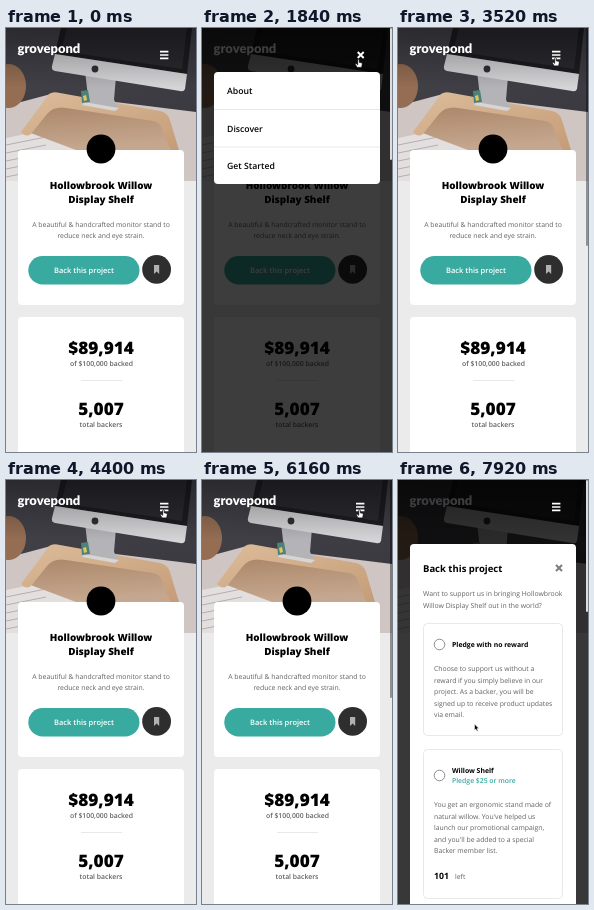
Animation, 190 px wide and 424 px high, one loop 8000 ms. Source, as an HTML page:

```html
<!DOCTYPE html>
<html lang="en">
<head>
<meta charset="utf-8">
<title>Campaign page</title>
<style>
  html, body { margin: 0; width: 100%; height: 100%; overflow: hidden; background: #ebebeb; }
  svg { display: block; width: 190px; height: 424px; }
  text { font: 6.85px "Open Sans", "Noto Sans", sans-serif; fill: #616161; text-rendering: geometricPrecision; }
  .mid { text-anchor: middle; }
  .semi { font-weight: 600; }
  .bold { font-weight: 700; fill: #000; }
  .title { font-size: 9.9px; font-weight: 800; }
  .stat { font-size: 17.2px; font-weight: 800; }
  .item { font-size: 8.7px; font-weight: 600; fill: #000; }
  .brand { font: 900 13px Lato, sans-serif; fill: #fff; }
  .line { fill: none; stroke: #e2e2e2; stroke-width: .8; }
  .radio { fill: #fff; stroke: #8b8b8b; stroke-width: 1; }
</style>
</head>
<body>
<svg viewBox="0 0 190 424">
  <defs>
    <linearGradient id="shade" x2="0" y2="1">
      <stop offset="0" stop-opacity=".4"/><stop offset="1" stop-opacity="0"/>
    </linearGradient>
    <linearGradient id="wall" x2=".3" y2="1">
      <stop offset="0" stop-color="#47464d"/><stop offset="1" stop-color="#38363d"/>
    </linearGradient>
    <linearGradient id="wood" x2="1" y2="1">
      <stop offset="0" stop-color="#dcbc9a"/><stop offset="1" stop-color="#c59c78"/>
    </linearGradient>
    <linearGradient id="inside" x2=".2" y2="1">
      <stop offset="0" stop-color="#a98465"/><stop offset="1" stop-color="#c5a78f"/>
    </linearGradient>
    <clipPath id="photo"><path d="M0 0H190V153H0Z"/></clipPath>
  </defs>

  <path fill="#ebebeb" d="M0 0H190V424H0Z"/>
  <g clip-path="url(#photo)">
    <path fill="url(#wall)" d="M0 0H190V153H0Z"/>
    <path fill="#cfc6c4" d="M0 78 45 66 190 84V153H0Z"/>
    <ellipse cx="3" cy="58" rx="17" ry="22" fill="#946d53"/>
    <path fill="#e4dfdf" d="M0 110 40 102 80 122V153H0Z"/>
    <path stroke="#a9a0a2" stroke-width=".8" d="M0 117 40 109M0 125 40 117M0 133 40 125M0 141 40 133M0 149 40 141"/>
    <path fill="url(#inside)" d="M34 84 52 74 154 92 164 122H70L22 104Z"/>
    <path fill="url(#wood)" d="M43 66Q47 63 54 65L154 83Q162 85 164 92L173 122H164L155 99Q153 94 147 93L60 80Q48 78 41 86L25 106Q20 110 15 104Z"/>
    <path fill="#b3b3b8" d="M79 43 110 48 108 72 113 80 78 74 82 69Z"/>
    <path fill="#d6d5d8" d="M78 74 113 80 109 83 76 77Z"/>
    <path fill="#1d1d21" d="M55 0H186L181 46 49 26Z"/>
    <path fill="#2b2a30" d="M61 0H181L176 41 55 23Z"/>
    <path fill="#d5d5d8" d="M49 26 181 46 179 61Q178 64 174 63L49 43Q45 42 46 38Z"/>
    <circle cx="89" cy="41" r="3.4" fill="#303034"/>
    <path fill="#4f8176" d="M75 63 82 62 84 74 76 75Z"/>
    <path fill="#e0c565" d="M77 68 80 67 81 72 78 73Z"/>
    <path fill="url(#shade)" d="M0 0H190V60H0Z"/>
  </g>
  <text class="brand" x="11.5" y="25">grovepond</text>

  <rect x="12" y="122" width="166" height="155" rx="4" fill="#fff"/>
  <circle cx="95" cy="121" r="14.4"/>
  <text class="mid bold title" x="95" y="161">Hollowbrook Willow</text>
  <text class="mid bold title" x="95" y="174.5">Display Shelf</text>
  <text class="mid" x="95" y="198.5">A beautiful &amp; handcrafted monitor stand to</text>
  <text class="mid" x="95" y="210">reduce neck and eye strain.</text>
  <rect x="22.3" y="228" width="111.2" height="28.4" rx="14.2" fill="#38aaa0"/>
  <text class="mid semi" x="78" y="244.7" style="font-size:7.5px;fill:#fff">Back this project</text>
  <circle cx="150.6" cy="241.4" r="14.4" fill="#2e2e2e"/>
  <path fill="#b1b1b1" d="M148 237H153.2V246L150.6 243.5 148 246Z"/>

  <rect x="12" y="289" width="166" height="160" rx="4" fill="#fff"/>
  <text class="mid bold stat" x="95" y="326">$89,914</text>
  <text class="mid semi" x="95.5" y="338">of $100,000 backed</text>
  <path class="line" d="M75 352.5H116"/>
  <text class="mid bold stat" x="95" y="387">5,007</text>
  <text class="mid semi" x="95" y="399">total backers</text>

  <path id="veil" opacity=".76" d="M0 0H190V424H0Z"/>
  <path id="bars" stroke="#fff" stroke-width="1.7" d="M154 23.6H162.4M154 27H162.4M154 30.4H162.4"/>

  <g id="menu">
    <path stroke="#fff" stroke-width="1.9" d="M155.7 24 161.7 30M161.7 24 155.7 30"/>
    <rect x="12" y="44" width="166" height="112" rx="4" fill="#fff"/>
    <path class="line" d="M12 81.5H178M12 119H178"/>
    <text class="item" x="25" y="66.3">About</text>
    <text class="item" x="25" y="103.8">Discover</text>
    <text class="item" x="25" y="141.2">Get Started</text>
  </g>

  <g id="dialog">
    <rect x="12" y="64" width="166" height="380" rx="4" fill="#fff"/>
    <text class="bold" x="25" y="91.7" style="font-size:9.5px">Back this project</text>
    <path stroke="#7d7d7d" stroke-width="2" d="M158 85 164 91M164 85 158 91"/>
    <g id="intro"></g>
    <rect class="line" x="25.5" y="143.5" width="139" height="112" rx="4"/>
    <circle class="radio" cx="41.5" cy="164.5" r="5.3"/>
    <text class="bold" x="54" y="166.5">Pledge with no reward</text>
    <g id="plain"></g>
    <rect class="line" x="25.5" y="269.5" width="139" height="149" rx="4"/>
    <circle class="radio" cx="41.5" cy="295.5" r="5.3"/>
    <text class="bold" x="54" y="292.7">Willow Shelf</text>
    <text class="semi" x="54" y="303" style="fill:#38aaa0">Pledge $25 or more</text>
    <g id="reward"></g>
    <text class="bold" x="36" y="399.3" style="font-size:8.7px">101</text>
    <text x="57" y="399">left</text>
  </g>

  <rect id="thumb" x="188" y="0" width="2" rx="1"/>
  <g id="cursor" stroke-linejoin="round">
    <path id="hand" fill="#fff" stroke="#000" stroke-width=".7" d="M-.8 .8Q0-.4.8.8V3.3L3 3.8Q4 4 3.8 5L3.2 8.4H-1.4L-3.2 5.4Q-3.2 4.2-2 4.8L-.8 5.8Z"/>
    <path id="arrow" stroke="#fff" stroke-width=".5" d="M0 0V6.2L1.4 5 2.4 7.3 3.5 6.8 2.5 4.6H4.4Z"/>
  </g>
</svg>
<script>
const LOOP = 8000;
const $ = id => document.getElementById(id);

function paragraph(id, x, y, lines) {
  $(id).innerHTML = lines.map((s, i) => `<text x="${x}" y="${y + i * 11.6}">${s}</text>`).join("");
}
paragraph("intro", 25, 116, [
  "Want to support us in bringing Hollowbrook", "Willow Display Shelf out in the world?"]);
paragraph("plain", 36, 191, [
  "Choose to support us without a", "reward if you simply believe in our",
  "project. As a backer, you will be", "signed up to receive product updates", "via email."]);
paragraph("reward", 36, 327, [
  "You get an ergonomic stand made of", "natural willow. You've helped us",
  "launch our promotional campaign,", "and you'll be added to a special", "Backer member list."]);

// Start time and view
const views = [[0, "page"], [1840, "menu"], [3200, "page"], [4800, "menu"], [6160, "page"], [7440, "dialog"]];
// Pointer: time, x, y
const path = [[560, 192, 300], [1280, 156.5, 31], [3120, 156.5, 31], [3280, 157.5, 29.5],
  [6560, 157.5, 29.5], [7280, 76.5, 244], [LOOP, 76.5, 244]];

const show = (id, on) => $(id).style.display = on ? "" : "none";
const ease = u => u * u * (3 - 2 * u);

function pointer(t) {
  const i = Math.max(1, path.findIndex(p => p[0] > t));
  const [a, b] = [path[i - 1], path[i]];
  const u = ease(Math.max(0, (t - a[0]) / (b[0] - a[0])));
  return [a[1] + (b[1] - a[1]) * u, a[2] + (b[2] - a[2]) * u];
}

function draw(now) {
  const t = now % LOOP;
  const [start, view] = views.filter(v => v[0] <= t).pop();
  const page = view === "page";
  show("veil", !page);
  show("bars", view !== "menu");
  show("menu", view === "menu");
  show("dialog", view === "dialog");

  const thumb = $("thumb");
  thumb.setAttribute("height", page ? 218 : 132);
  thumb.setAttribute("fill", page ? "rgba(0,0,0,.38)" : "#ddd");
  thumb.setAttribute("opacity", start ? Math.min(1, Math.max(0, (800 - t + start) / 300)) : 0);

  const [x, y] = pointer(t);
  const onIcon = x > 150 && x < 166 && y > 18 && y < 36;
  const onButton = page && x > 22 && x < 133 && y > 228 && y < 256;
  show("cursor", t >= path[0][0]);
  show("hand", onIcon || onButton);
  show("arrow", !onIcon && !onButton);
  $("cursor").setAttribute("transform", `translate(${x} ${y})`);
  requestAnimationFrame(draw);
}
requestAnimationFrame(draw);
</script>
</body>
</html>
```
